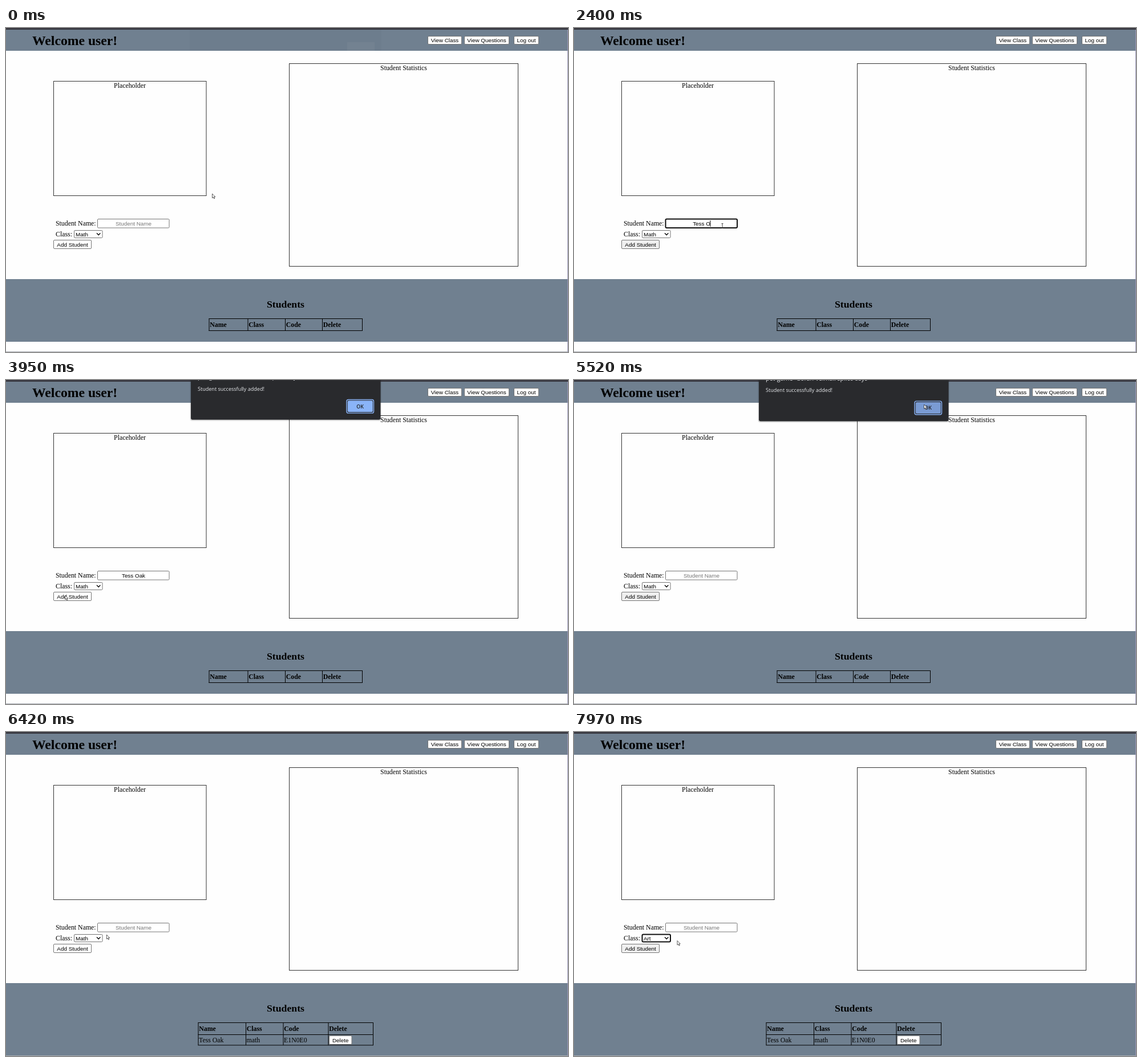
These frames come from a looping animation (985 by 569 pixels, 8000 ms). An HTML page:

```html
<!DOCTYPE html>
<html lang="en">
<head>
<meta charset="utf-8">
<title>Student manager</title>
<style>
html, body { margin: 0; width: 100%; height: 100%; overflow: hidden; background: #fefefe; }
svg { display: block; width: 100%; height: 100%; }
text { white-space: pre; font: 11.84px "Liberation Serif", "Times New Roman", serif; }
.h1 { font-size: 23.68px; font-weight: bold; }
.h2 { font-size: 17.76px; font-weight: bold; }
.b { font-weight: bold; }
.ui { font: 9.87px "Liberation Sans", Arial, sans-serif; }
.msg { font: 9.06px "Open Sans", sans-serif; fill: #e8eaed; }
.url { font: 10.7px "Open Sans", sans-serif; fill: #e8eaed; }
.ok { font: 600 8.9px "Open Sans", sans-serif; fill: #202124; }
.mid { text-anchor: middle; }
</style>
</head>
<body>
<svg id="stage" viewBox="0 0 985 569"></svg>
<script>
const LOOP = 8000, SLATE = '#708090', GREY = '#767676';
const stage = document.getElementById('stage');
const pen = document.createElement('canvas').getContext('2d');
pen.font = '9.87px "Liberation Sans", Arial, sans-serif';

const NAME = 'Tess Oak';
const KEYS = [1230, 1430, 1640, 1840, 1970, 2400, 2550, 2860];
const CLASSES = ['Math', 'Science', 'Art', 'English', 'History'];
const FOCUS = 460, SUBMIT = 3780, CONFIRM = 5430, ADDED = 5600, OPEN = 6720, PICK = 7880;
const LIST_Y = 369, ROW = 13;

// Pointer way points: time, x, y
const PATH = [
  [30, 361.5, 291], [460, 260, 347], [3280, 260, 347], [3390, 121.5, 357.5],
  [3630, 103.5, 378], [4180, 103.5, 378], [4560, 533, 53], [4720, 590, 46],
  [5200, 613.5, 43], [5640, 613.5, 43], [6210, 295, 301], [6420, 176.5, 356],
  [6700, 140, 358], [7040, 140, 369], [7510, 140, 398], [7880, 140, 398], [7970, 181, 366.5]
];

const clamp = v => Math.max(0, Math.min(1, v));
const within = (t, a, b) => t >= a && t < b;
const rect = (x, y, w, h, fill, more = '') =>
  `<rect x="${x}" y="${y}" width="${w}" height="${h}" fill="${fill}" ${more}/>`;
const frame = (x, y, w, h) => rect(x, y, w, h, 'none', 'stroke="#333"');
const text = (x, y, s, cls = '', more = '') => `<text x="${x}" y="${y}" class="${cls}" ${more}>${s}</text>`;
const line = d => `<path d="${d}" fill="none" stroke="#000"/>`;
const box = (x, y, w, h, focused, fill = '#fff') => focused
  ? rect(x, y, w, h, fill, 'rx="2" stroke="#101010" stroke-width="2"')
  : rect(x, y, w, h, fill, `rx="1.5" stroke="${GREY}"`);
const button = (x, y, w, h, label, fill) =>
  box(x, y, w, h, false, fill) + text(x + w / 2, y + h / 2 + 3.5, label, 'ui mid');

function pointerAt(t) {
  const i = PATH.findIndex(p => p[0] > t);
  if (i < 0) return PATH[PATH.length - 1].slice(1);
  if (i === 0) return PATH[0].slice(1);
  const [t0, x0, y0] = PATH[i - 1], [t1, x1, y1] = PATH[i], k = (t - t0) / (t1 - t0);
  return [x0 + (x1 - x0) * k, y0 + (y1 - y0) * k];
}

function pointer([x, y]) {
  const overInput = x > 160 && x < 286 && y > 335 && y < 351;
  const shape = overInput
    ? '<path d="M-1.5-3.5H1.5M0-3.5V4.5M-1.5 4.5H1.5" fill="none" stroke="#333" stroke-width=".9"/>'
    : '<path d="M0 0V7.6L1.8 6 3.1 8.8 4.3 8.2 3.1 5.5H5.3Z" fill="#fff" stroke="#333" stroke-width=".8"/>';
  return `<g transform="translate(${x} ${y})">${shape}</g>`;
}

function header() {
  return rect(0, 0, 985, 3, '#3a3a42') + rect(0, 3, 984, 37, SLATE) +
    text(46, 30, 'Welcome user!', 'h1') +
    button(739.5, 14.5, 59, 14, 'View Class') +
    button(803.5, 14.5, 78, 14, 'View Questions') +
    button(890.5, 14.5, 43, 14, 'Log out');
}

function nameField(t) {
  const focused = within(t, FOCUS, SUBMIT);
  const typed = t < CONFIRM ? NAME.slice(0, KEYS.filter(k => k <= t).length) : '';
  let out = box(160.5, 335.5, 125.5, 15.5, focused) +
    text(223.5, 346.5, typed || 'Student Name', 'ui mid', typed ? '' : `fill="${GREY}"`);
  if (focused) {
    const last = Math.max(FOCUS, ...KEYS.filter(k => k <= t));
    if ((t - last) % 1000 < 500)
      out += rect(223 + pen.measureText(typed).width / 2, 338, 1, 11, '#000');
  }
  return out;
}

function form(t) {
  const plain = t < FOCUS || within(t, SUBMIT, CONFIRM) || within(t, 6210, PICK);
  return text(87, 347, 'Student Name:') + nameField(t) +
    text(87, 365.5, 'Class:') + box(119.5, 355.5, 49.5, 13, t >= OPEN) +
    text(122, 365.5, t < PICK ? 'Math' : 'Art', 'ui') +
    '<path d="M159 360.3l3.2 3.2 3.2-3.2" fill="none" stroke="#000" stroke-width="1.3"/>' +
    button(83.5, 372.5, 66, 15, 'Add Student', plain ? '#fff' : '#efefef');
}

function table(added) {
  const cols = added ? [337, 420.5, 486, 565, 643.5] : [356, 424, 489.5, 554.5, 624.5];
  const bottom = added ? 550 : 531.5;
  let out = rect(0, 441, 984, added ? 128 : 110, SLATE) + text(490, 490.5, 'Students', 'h2 mid') +
    line(cols.map(x => `M${x} 510.5V${bottom}`).join('')) +
    line([510.5, 531.5, bottom].map(y => `M${cols[0] - .5} ${y}H${cols[4] + .5}`).join(''));
  ['Name', 'Class', 'Code', 'Delete'].forEach((s, i) => out += text(cols[i] + 1.2, 525, s, 'b'));
  if (added) {
    [NAME, 'math', 'E1N0E0'].forEach((s, i) => out += text(cols[i] + 1, 544.5, s));
    out += button(566.5, 533.5, 39.5, 15, 'Delete');
  }
  return out;
}

function dialog(t, px) {
  const shown = Math.min(clamp((t - SUBMIT) / 220), 1 - clamp((t - 5520) / 200));
  if (!shown) return '';
  const hover = px > 597 && t < 5720;
  return `<g transform="translate(0 ${-12 * (1 - shown)})" opacity="${Math.min(1, shown * 1.5)}">` +
    rect(322.5, -20, 335, 94.5, '#000', 'rx="4" opacity=".15"') +
    rect(324, -20, 332.5, 92.5, '#292a2d', 'rx="3"') +
    text(336, 1, 'pet-game--doran-velma.repl.co says', 'url') +
    text(336, 21.5, 'Student successfully added!', 'msg') +
    rect(597, 37.2, 47.5, 23.6, 'none', 'rx="3" stroke="#8ab4f8" stroke-width="1.4"') +
    rect(598.8, 39, 44, 20, hover ? '#7a9bd3' : '#8ab4f8', 'rx="2"') +
    text(620.5, 52.3, 'OK', 'ok mid') + '</g>';
}

function dropdown(t, py) {
  if (!within(t, OPEN, PICK)) return '';
  const active = Math.max(0, Math.floor((py - LIST_Y) / ROW));
  return rect(118, LIST_Y, 53, 68, '#000', 'opacity=".12"') +
    rect(119.5, LIST_Y - .5, 49.5, ROW * CLASSES.length + 1, '#fff', `stroke="${GREY}"`) +
    CLASSES.map((s, i) => {
      const y = LIST_Y + i * ROW, on = i === active;
      return (on ? rect(120, y, 48.5, ROW, '#1e78e0') : '') +
        text(122, y + 10, s, 'ui', on ? 'fill="#fff"' : '');
    }).join('');
}

function draw(t) {
  const at = pointerAt(t);
  const afterglow = t < FOCUS
    ? rect(322, 3, 336, 37, '#000', 'opacity=".025"') + rect(598, 25, 48, 15, '#fff', 'opacity=".04"') : '';
  stage.innerHTML = rect(0, 0, 985, 569, '#fefefe') + header() + afterglow +
    frame(83.5, 93.5, 267.5, 201) + text(217, 104.5, 'Placeholder', 'mid') +
    frame(496.5, 62.5, 401, 356) + text(697, 73.5, 'Student Statistics', 'mid') +
    form(t) + table(t >= ADDED) +
    rect(0, 568, 985, 1, '#a9adb3') + rect(984, 3, 1, 566, '#9793b5') +
    dropdown(t, at[1]) + dialog(t, at[0]) + pointer(at);
}

const start = performance.now();
function tick() {
  draw((performance.now() - start) % LOOP);
  requestAnimationFrame(tick);
}
tick();
</script>
</body>
</html>
```
